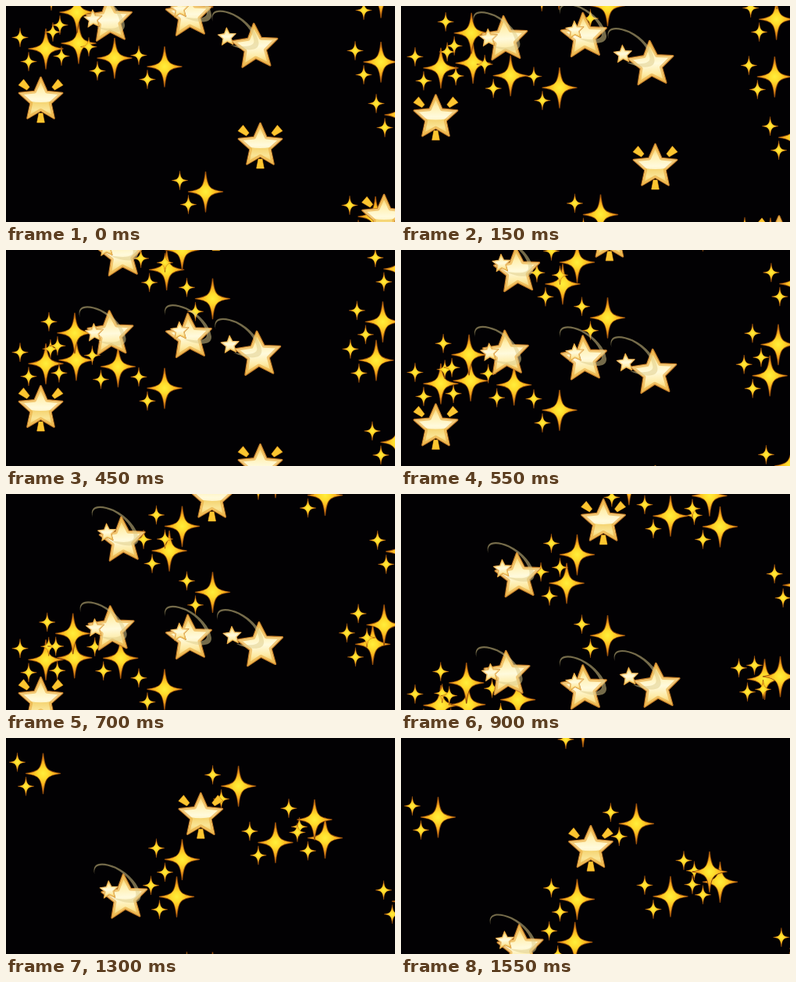
An HTML page with a canvas that plays this animation: 498x278 px, repeating every 1600 ms.

```html
<!DOCTYPE html>
<html>
<head>
<meta charset="utf-8">
<style>
html, body { margin: 0; height: 100%; overflow: hidden; background: #020103; }
canvas { display: block; }
</style>
</head>
<body>
<canvas id="stage" width="498" height="278"></canvas>
<script>
const ctx = document.getElementById('stage').getContext('2d');
const LOOP = 1600, STEP = 50;

// Shared fall: starts slowly and approaches a terminal speed.
const fallAt = t => .387 * t - 138 * (1 - Math.exp(-t / 600));

// Each object starts at x, y and moves by speed (and sideways drift) per unit of fall.
const sparkles = [
  [203, 78, .985], [255.5, 239, 1.07], [51, 55, .9], [93, 48, .925, -.03],
  [139, 67, .82, .044], [91, 8, .975, -.03], [480, 72, .69, -.06],
  [507, 140, 1.06, -.05], [480, -11, 1.02, .023], [502, -43, .665, .038],
  [264.5, -24, .855], [201, -39.5, .64, .046], [225.5, -57, .56],
  [408.5, -107.5, .62], [345, -155, .76], [395, -175, .735],
  [282, -140, .53, .041], [47.5, -189, .616], [233, -298, .6], [473, 271, 1]
];
const glows = [[44.5, 121, .82], [325.5, 180, .98], [484, 272, 1], [276, -75, .46, -.07]];
// Dizzy stars also carry the offset of the large star from the small one.
const dizzies = [
  [111.5, 17, .885, .015, 21, 2], [222.5, 4, .99, 0, 12, 8],
  [283, 40, .81, .038, 36, 13], [127, -75, .711, .013, 20, 10]
];

function gradient(g, ...colors) {
  colors.forEach((c, i) => g.addColorStop(i / (colors.length - 1), c));
  return g;
}
const sparkFill = gradient(ctx.createRadialGradient(0, 0, 0, 0, 0, 26),
  '#ffee3c', '#ffdc2c', '#fbb820', '#e08a18', '#a8580c');
const starFill = gradient(ctx.createLinearGradient(0, -27, 0, 25),
  '#f6cc60', '#fff0b0', '#fffadc', '#fdeaa4', '#f2c858');
const lowerFill = gradient(ctx.createLinearGradient(0, 0, 0, 25),
  '#f3cf68', '#fae596', '#f2c452');

function at(x, y, scale, turn, draw) {
  ctx.save();
  ctx.translate(x, y);
  ctx.scale(scale, scale);
  ctx.rotate(turn);
  draw();
  ctx.restore();
}

function paint(fill, stroke, width) {
  ctx.lineJoin = 'round';
  ctx.lineWidth = width;
  ctx.strokeStyle = stroke;
  ctx.stroke();
  ctx.fillStyle = fill;
  ctx.fill();
}

function spark() {
  ctx.beginPath();
  ctx.moveTo(0, -26);
  for (const [sx, sy] of [[1, 1], [-1, -1]]) {
    ctx.bezierCurveTo(2 * sx, -5.5 * sy, 5 * sx, -2.2 * sy, 22 * sx, 0);
    ctx.bezierCurveTo(5 * sx, 2.2 * sy, 2 * sx, 5.5 * sy, 0, 26 * sy);
  }
  paint(sparkFill, '#8a460a', 1.4);
}

function sparkle(x, y) {
  at(x, y, 1, 0, spark);
  at(x - 33, y - 14.5, .47, 0, spark);
  at(x - 22, y + 16.5, .47, 0, spark);
}

function star(glossy) {
  const outline = new Path2D();
  for (let i = 0; i < 10; i++) {
    const r = i % 2 ? 13.5 : 29, a = i * Math.PI / 5;
    outline.lineTo(r * Math.sin(a), -r * Math.cos(a));
  }
  outline.closePath();
  ctx.lineJoin = 'round';
  ctx.lineWidth = 2.6;
  ctx.strokeStyle = '#c8802a';
  ctx.stroke(outline);
  ctx.fillStyle = starFill;
  ctx.fill(outline);
  ctx.save();
  ctx.clip(outline);
  if (glossy) {
    ctx.beginPath();
    ctx.moveTo(-30, -3);
    ctx.quadraticCurveTo(0, 9, 30, -3);
    ctx.lineTo(30, 30);
    ctx.lineTo(-30, 30);
    ctx.fillStyle = lowerFill;
    ctx.fill();
  }
  ctx.lineWidth = 5;
  ctx.strokeStyle = 'rgba(234,170,62,.6)';
  ctx.stroke(outline);
  ctx.restore();
}

function ray() {
  ctx.beginPath();
  ctx.moveTo(-2.5, 17);
  ctx.lineTo(2.5, 17);
  ctx.lineTo(4.8, 29);
  ctx.lineTo(-4.8, 29);
  ctx.closePath();
  paint('#fcc630', '#b06c10', 1);
}

function glow(x, y) {
  at(x, y, 1, 0, () => star(true));
  at(x, y, 1, 0, ray);
  for (const side of [-1, 1]) at(x + side * 3.5, y - 3.5, 1, side * -2.3, ray);
}

// Tapered tail, leftmost point at the local origin.
function swirl() {
  ctx.beginPath();
  ctx.moveTo(1, 5);
  ctx.bezierCurveTo(-4, -12, 12, -12, 28, -5);
  ctx.bezierCurveTo(46, 4, 58, 18, 60, 32);
  ctx.bezierCurveTo(61, 45, 40, 43, 24, 35);
  ctx.bezierCurveTo(40, 38, 54, 38, 54, 30);
  ctx.bezierCurveTo(53, 18, 42, 5, 27, -3);
  ctx.bezierCurveTo(12, -9.5, -1.5, -9.5, 1, 5);
  ctx.fillStyle = 'rgba(222,206,140,.52)';
  ctx.fill();
}

function dizzy(x, y, dx, dy) {
  at(x + dx, y + dy, 1.04, -.06, star);
  at(x - 19.5, y - 25, 1, 0, swirl);
  at(x, y, .42, -.06, star);
}

function render(t) {
  const fall = fallAt(t);
  const each = (list, draw) => list.forEach(([x, y, speed, drift = 0, ...rest]) =>
    draw(x + drift * fall, y + speed * fall, ...rest));
  ctx.fillStyle = '#020103';
  ctx.fillRect(0, 0, 498, 278);
  each(sparkles, sparkle);
  each(dizzies, dizzy);
  each(glows, glow);
}

function tick() {
  render(Math.floor(performance.now() % LOOP / STEP) * STEP);
  requestAnimationFrame(tick);
}
tick();
</script>
</body>
</html>
```
